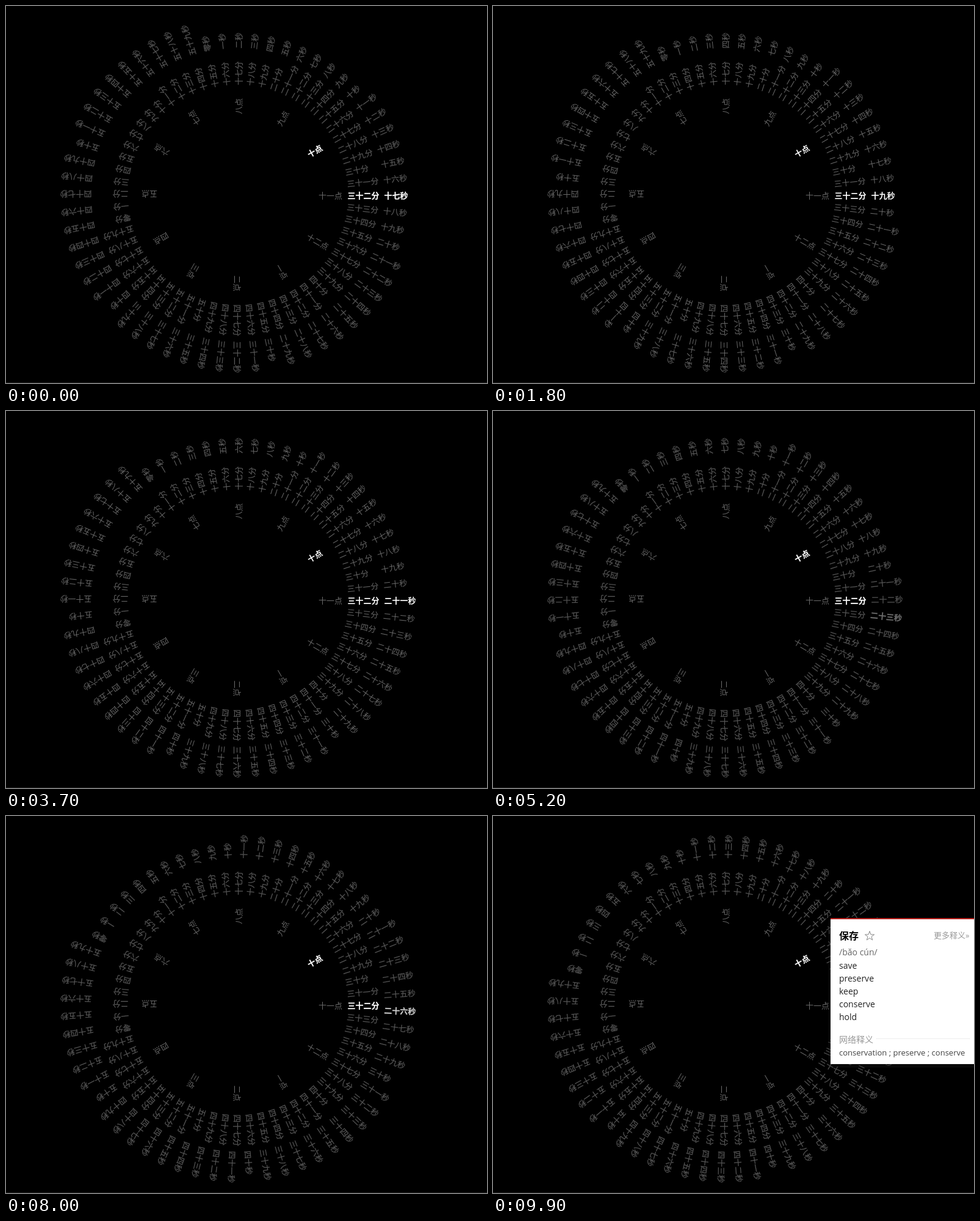
Animation of 788x617 px, one loop 10000 ms. Source, as an HTML page:

```html
<!DOCTYPE html>
<html lang="zh-CN">
<head>
<meta charset="utf-8">
<title>文字时钟</title>
<style>
  html, body { margin: 0; width: 100%; height: 100%; overflow: hidden; background: #000; }
  svg { display: block; width: 788px; height: 617px; }
  text { font-family: "Noto Sans CJK SC", "Noto Sans CJK", sans-serif; }
  .ring text { font-size: 13px; fill: currentColor; color: #666; }
  .ring .on { font-weight: 700; color: #fff; }
  .soft .fine text, .soft .on { stroke: currentColor; stroke-width: .4px; stroke-opacity: .5; }
  .soft .fine text:not(.on) { color: #585858; }
  .latin { font-family: "Open Sans", "Noto Sans", sans-serif; font-size: 14px; fill: #222; }
</style>
</head>
<body>
<svg id="stage" viewBox="0 0 788 617">
  <defs>
    <filter id="glow" x="-20%" y="-20%" width="140%" height="140%">
      <feDropShadow dx="0" dy="3" stdDeviation="4" flood-color="#1a1a1a" flood-opacity=".6"/>
    </filter>
  </defs>
  <rect width="788" height="617" fill="#000"/>
  <rect y="616" width="788" height="1" fill="#1c1c1c"/>
  <g id="clock" transform="translate(380 309)"></g>
  <g id="card" visibility="hidden">
    <rect x="553" y="167" width="245" height="239" fill="#fff" filter="url(#glow)"/>
    <rect x="553" y="167" width="245" height="2" fill="#b8201c"/>
    <text x="567" y="202" font-size="16" font-weight="700" fill="#000">保存</text>
    <path id="star" fill="none" stroke="#888" stroke-width="1"/>
    <text x="722" y="200" font-size="13" fill="#999">更多释义<tspan font-family="Open Sans, sans-serif">»</tspan></text>
    <text class="latin" x="567" y="228" style="fill:#666">/bǎo cún/</text>
    <g id="words"></g>
    <text x="567" y="371" font-size="14" fill="#999">网络释义</text>
    <path d="M628 364.5H781" stroke="#ddd" stroke-dasharray="1 1"/>
    <text class="latin" x="567" y="392" style="font-size:13px;fill:#434343">conservation ; preserve ; conserve</text>
  </g>
</svg>
<script>
const LOOP = 10000, STEP = 100, TURN = 280, SETTLE = 310, CARD_AT = 8600;
const FIRST = 17, HOUR = 10, MINUTE = 32;
// Moments at which the second hand advances
const TICKS = [-280, 780, 1480, 2470, 3380, 4295, 5182, 6075, 7070, 7890, 8854, 9756];

const $ = id => document.getElementById(id);
const add = (parent, tag, attrs = {}, text = '') => {
  const el = document.createElementNS('http://www.w3.org/2000/svg', tag);
  for (const k in attrs) el.setAttribute(k, attrs[k]);
  el.textContent = text;
  return parent.appendChild(el);
};

function numeral(n) {
  const d = '零一二三四五六七八九';
  if (n < 10) return d[n];
  const tens = Math.floor(n / 10);
  return (tens > 1 ? d[tens] : '') + '十' + (n % 10 ? d[n % 10] : '');
}

function ring(cls, radius, from, count, unit, current) {
  const g = add($('clock'), 'g', { class: 'ring ' + cls });
  const items = [];
  for (let n = from; n < from + count; n++) {
    const el = add(g, 'text', { x: radius, y: 6, transform: `rotate(${n * 360 / count})` }, numeral(n) + unit);
    if (n === current) el.setAttribute('class', 'on');
    items.push(el);
  }
  return { g, items };
}

const turn = (r, deg) => r.g.setAttribute('transform', `rotate(${deg})`);

const hours = ring('', 132, 1, 12, '点', HOUR);
const minutes = ring('fine', 179.5, 0, 60, '分', MINUTE);
const seconds = ring('fine', 239.5, 0, 60, '秒');
turn(hours, -11 * 30);
turn(minutes, -MINUTE * 6);

['save', 'preserve', 'keep', 'conserve', 'hold'].forEach((w, i) =>
  add($('words'), 'text', { class: 'latin', x: 567, y: 250 + 21 * i }, w));

const star = [];
for (let i = 0; i < 10; i++) {
  const r = i % 2 ? 3.2 : 8, a = (i * 36 - 90) * Math.PI / 180;
  star.push((617 + r * Math.cos(a)).toFixed(2) + ' ' + (196.5 + r * Math.sin(a)).toFixed(2));
}
$('star').setAttribute('d', 'M' + star.join('L') + 'Z');

// cubic-bezier(.25, .1, .25, 1)
function ease(x) {
  if (x <= 0) return 0;
  if (x >= 1) return 1;
  const curve = (u, a, b) => 3 * (1 - u) * (1 - u) * u * a + 3 * (1 - u) * u * u * b + u * u * u;
  let lo = 0, hi = 1;
  for (let i = 0; i < 24; i++) {
    const mid = (lo + hi) / 2;
    if (curve(mid, .25, .25) < x) lo = mid; else hi = mid;
  }
  return curve(lo, .1, 1);
}

function draw(ms) {
  const t = Math.floor(ms % LOOP / STEP) * STEP;
  const i = TICKS.filter(s => s <= t).length - 1;
  const age = t - TICKS[i], p = ease(age / TURN), now = FIRST + i;
  turn(seconds, -(now - 1 + p) * 6);
  seconds.items.forEach((el, n) => {
    const on = n === now, v = Math.round(102 + 153 * p);
    el.setAttribute('class', on ? 'on' : '');
    el.style.color = on ? `rgb(${v},${v},${v})` : '';
  });
  $('clock').setAttribute('class', age < SETTLE ? 'soft' : '');
  $('card').setAttribute('visibility', t >= CARD_AT ? 'visible' : 'hidden');
}

const start = performance.now();
function loop() {
  draw(performance.now() - start);
  requestAnimationFrame(loop);
}
loop();
</script>
</body>
</html>
```
